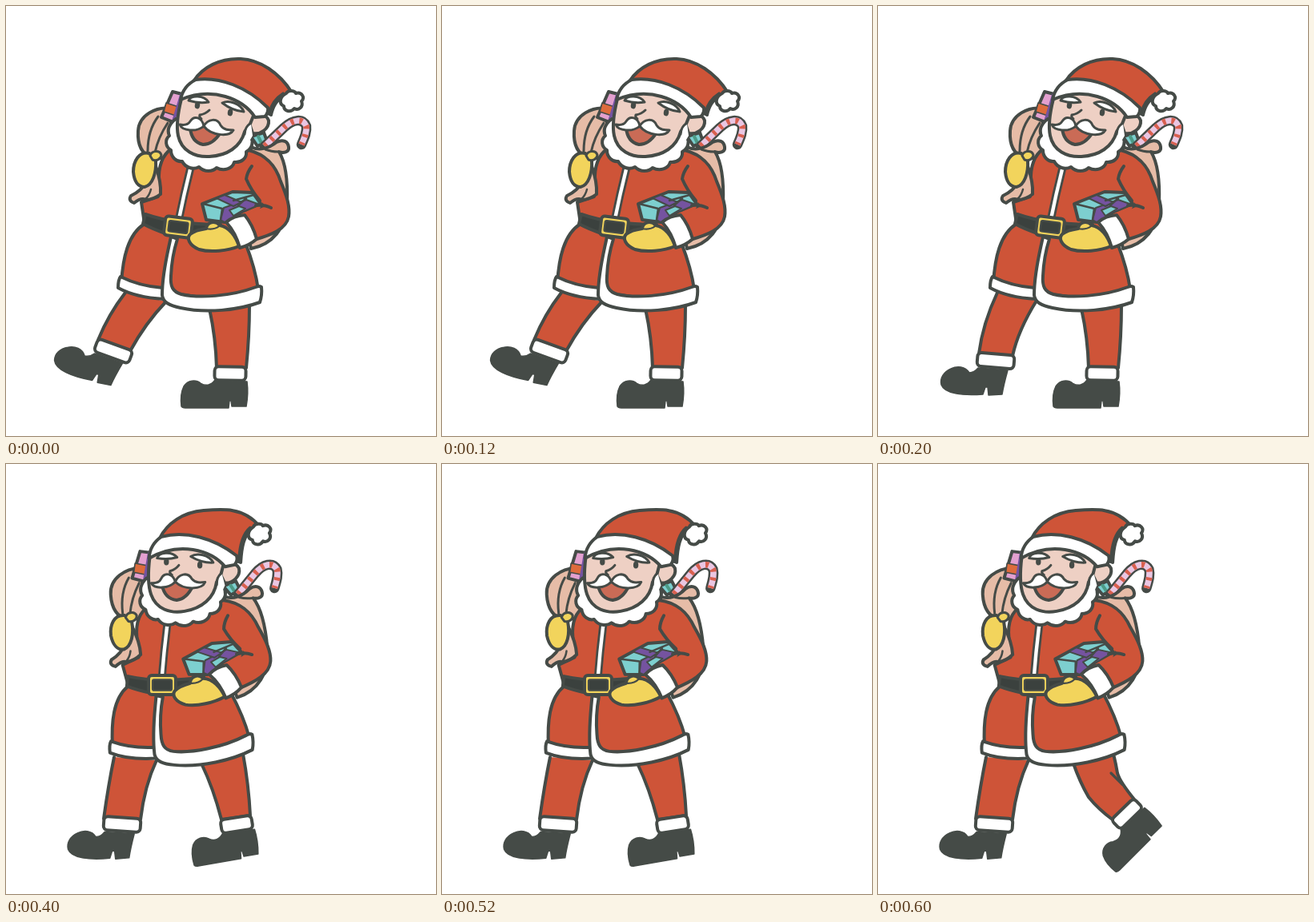
An HTML page with a canvas that plays this animation: 537 px wide and 537 px high, repeating every 800 ms.

```html
<!DOCTYPE html>
<html lang="en">
<head>
<meta charset="utf-8">
<title>Walking Santa</title>
<style>
html, body { margin: 0; width: 100%; height: 100%; overflow: hidden; background: #fff; }
canvas { display: block; width: 100vw; height: 100vh; }
</style>
</head>
<body>
<canvas id="stage" width="537" height="537"></canvas>
<script>
const ctx = document.getElementById('stage').getContext('2d');
const INK = '#454b47', RED = '#ce5438', WHITE = '#fff', SKIN = '#eed0c4', SACK = '#e6bca7',
  GOLD = '#f2d45c', TEAL = '#7dcfcf', PURPLE = '#7553a0', PINK = '#e3a0cf', BELT = '#3b413e';
const STEP = 200;

function shape(d, fill, line = INK, w = 4) {
  const p = new Path2D(d);
  if (fill) { ctx.fillStyle = fill; ctx.fill(p); }
  if (line) { ctx.strokeStyle = line; ctx.lineWidth = w; ctx.stroke(p); }
}
const stroke = (d, w, color) => shape(d, null, color, w);

function place(x, y, deg, draw) {
  ctx.save();
  ctx.translate(x, y);
  ctx.rotate(deg * Math.PI / 180);
  draw();
  ctx.restore();
}

function box(w, h, r, fill, lw = 4) {
  ctx.beginPath();
  ctx.roundRect(-w / 2, -h / 2, w, h, r);
  ctx.fillStyle = fill;
  ctx.fill();
  ctx.strokeStyle = INK;
  ctx.lineWidth = lw;
  ctx.stroke();
}

function dot(x, y, rx, ry, fill) {
  ctx.beginPath();
  ctx.ellipse(x, y, rx, ry, 0.15, 0, 7);
  ctx.fillStyle = fill;
  ctx.fill();
}

// Boots are drawn around the centre of their cuff.
function farFoot() {
  shape('M-22 9Q-27 15-33 15C-38 7-48 6-56 10C-65 14-70 22-68 30C-64 41-42 44-16 42L-13 33L-10 33L-9 43L8 42Q10 30 15 12Z', INK, INK, 1.5);
  place(0, 0, 5, () => box(46, 17, 5, WHITE));
}
function nearFoot() {
  shape('M-19 8C-24 15-31 16-37 12C-43 7-53 8-58 16C-62 24-62 33-61 41Q-60 43-56 43L-2 43L-1 34L1 34L2 41L20 41Q23 25 21 10Z', INK, INK, 1.5);
  place(0, 0, 1, () => box(39, 17, 5, WHITE));
}

const farPlanted = { leg: 'M135 366Q128 400 122 443L168 444Q173 402 188 370', foot: [145, 450, -1] };
const nearPlanted = { leg: 'M254 378Q262 414 263 452L300 452Q304 412 304 374', foot: [280, 459, 0] };
const poses = [
  { lean: 0, near: nearPlanted,
    far: { leg: 'M149 358Q128 385 115 417L155 431Q174 396 200 369', foot: [134, 431, 15] } },
  { lean: 0, near: nearPlanted,
    far: { leg: 'M149 358Q131 396 126 434L168 437Q175 405 198 368', foot: [147, 443, 0] } },
  { lean: 1, far: farPlanted,
    near: { leg: 'M244 374Q259 405 269 444L305 439Q303 400 296 362', foot: [288, 450, -10] } },
  { lean: 1, far: farPlanted,
    near: { leg: 'M244 374Q252 397 263 416Q275 431 294 445L321 420Q302 397 299 386Q297 374 294 362',
      knee: 'M291 386L305 400', foot: [311, 437, -45] } }
];

function limb({ leg, knee, foot }, drawFoot) {
  shape(leg, RED);
  if (knee) stroke(knee, 3.2);
  place(...foot, drawFoot);
}

function cane() {
  const d = 'M323 175L347 152C359 141 371 140 375 150C376 157 373 164 369 173';
  stroke(d, 12.5);
  ctx.lineCap = 'butt';
  stroke(d, 7.5, '#eac6e2');
  ctx.setLineDash([4, 7]);
  stroke(d, 7.5, '#d9604f');
  ctx.setLineDash([]);
  ctx.lineCap = 'round';
}

function back() {
  // sack
  shape('M206 128C188 125 166 136 165 156C164 172 168 184 182 190L206 190Z', SACK);
  stroke('M190 138Q177 155 177 181M202 146Q190 164 186 183', 3);
  // striped present
  shape('M208 107L224 111L214 147L194 139Z', PINK);
  shape('M200 121L219 127L215 138L197 132Z', '#dd6b3c', INK, 1.6);
  stroke('M219 111L209 144', 4, PURPLE);
  // teal present and cane
  shape('M306 163L322 158L326 169L314 175Z', TEAL);
  stroke('M315 163L319 171', 4, '#4c9a86');
  cane();
  // right side of the sack
  shape('M306 176C316 181 328 178 338 170C346 166 352 169 353 176C354 183 346 184 341 182C350 197 352 220 351 246C350 278 332 298 306 303L290 230Z', SACK);
  stroke('M340 182Q331 182 324 179', 3);
}

function coat() {
  shape('M207 178C195 186 190 200 191 220L190 238L169 245L173 272C152 285 146 315 144 346L200 358L260 366L315 354C312 333 306 314 299 296L330 230L305 178Z', RED);
  // hem and placket
  shape('M143 338Q140 342 140 352Q162 364 197 366L196 352Q167 350 143 338Z', WHITE);
  shape('M206 288C202 308 195 333 195 361C196 370 204 374 218 377C250 384 290 380 317 370Q320 361 319 351Q316 349 312 351C280 363 240 365 219 360C208 357 205 350 206 337Q207 313 214 291Z', WHITE);
  stroke('M230 204Q222 236 216 266', 10);
  stroke('M230 204Q222 236 216 266', 4.4, WHITE);
  // belt
  shape('M174 260Q211 273 268 273L266 284Q228 290 199 284Q182 278 171 272Z', BELT);
  place(215, 276, 7, () => {
    box(34, 24, 4, GOLD);
    box(24, 13.5, 2, BELT, 2.2);
  });
}

function present() {
  shape('M245 247L283 232L308 233L318 247L294 257L273 270L250 267Z', TEAL);
  shape('M272 252L300 242L317 248L294 258L273 270L268 267Z', PURPLE, INK, 2);
  shape('M263 240L273 236L294 245L284 250Z', PURPLE, INK, 2);
  shape('M279 255L291 250L299 253L284 262Z', TEAL, INK, 2);
  stroke('M246 247L270 253L268 267M284 243L309 236M290 249L300 240', 2.5);
}

function arm() {
  shape('M303 180C326 186 337 200 343 219C351 238 355 251 353 263C350 279 331 286 310 292L291 265L324 250Q306 229 302 210Z', RED, null);
  stroke('M303 180C326 186 337 200 343 219C351 238 355 251 353 263C350 279 331 286 310 292M307 200Q301 208 300 216Q306 230 317 243M312 249Q323 248 331 252');
  shape('M275 270Q284 262 298 261Q308 273 313 291Q304 299 292 302Q287 283 275 270Z', WHITE);
  shape('M230 285C236 280 243 279 250 278C251 270 261 267 267 274C279 276 287 288 291 300C277 306 255 308 241 304C229 299 225 290 230 285Z', GOLD);
  stroke('M250 278Q260 280 266 275', 2.2);
}

function grip() {
  shape('M176 219Q169 231 156 237Q152 243 160 246Q169 239 174 242Q184 242 193 235Q194 220 187 200Z', SACK);
  stroke('M174 241Q179 237 181 229', 2.5);
  shape('M179 184C166 181 159 194 159 207C160 219 165 226 173 226C183 224 188 208 187 193Z', GOLD);
  shape('M180 187C182 180 192 180 194 186C194 191 188 194 183 192Z', GOLD, INK, 3);
}

function head() {
  // beard
  shape('M212 141C203 148 201 155 204 162C198 167 199 176 206 180C206 189 213 195 220 194C224 202 234 205 241 201C248 208 258 207 263 202C272 207 283 203 285 195C294 196 301 190 300 182C308 178 309 169 306 164C310 158 309 151 304 146L290 130Z', WHITE);
  // ear
  shape('M301 138C311 132 325 134 328 143C329 153 318 161 308 159Z', SKIN);
  // face
  shape('M219 116C215 132 212 148 215 162C219 181 236 189 254 188C276 187 293 176 298 157L305 147L311 132L294 109L255 100Z', SKIN);
  shape('M299 160Q300 150 306 147L308 162L302 172Z', WHITE, null);
  stroke('M298 160Q299 150 305 147', 3);
  // mouth
  shape('M230 152C231 164 237 171 246 173C256 173 263 166 268 158L247 150Z', '#ca6b56');
  // moustache
  shape('M247 150C245 139 235 136 230 144C227 149 222 149 217 148C220 156 238 158 247 150Z', WHITE, INK, 3);
  shape('M247 150C252 141 264 139 268 149C272 155 278 155 284 155C279 164 256 162 247 150Z', WHITE, INK, 3);
  stroke('M254 130Q249 135 242 136Q241 139 244 141', 3);
  // eyes and brows
  dot(239, 124, 3.2, 4.4, INK);
  dot(280, 133, 3.2, 4.4, INK);
  shape('M228 118C231 111 247 111 253 120Q241 122 228 118Z', WHITE, INK, 3);
  shape('M270 121C279 117 293 122 297 132Q283 131 270 121Z', WHITE, INK, 3);
}

function hat(lean) {
  const at = (x, y) => `${x + 2 * lean} ${y - 15 * lean}`;
  shape(`M234 94C246 76 267 65 293 66C317 67 ${at(341, 83)} ${at(357, 108)}L${at(346, 114)}Q${at(335, 118)} 331 136L300 120Z`, RED);
  stroke(`M${at(346, 109)}Q${at(332, 118)} 329 133`, 3.2);
  shape('M218 117C220 106 227 97 237 92C267 88 301 101 327 127Q328 134 323 138L311 139C296 116 258 100 218 117Z', WHITE);
  shape(`M${at(350, 109)}C${at(353, 104)} ${at(361, 106)} ${at(362, 109)}C${at(369, 107)} ${at(374, 114)} ${at(369, 119)}C${at(372, 126)} ${at(365, 131)} ${at(360, 128)}C${at(355, 134)} ${at(347, 131)} ${at(347, 125)}C${at(340, 122)} ${at(342, 113)} ${at(350, 109)}Z`, WHITE);
}

function draw(ms) {
  const pose = poses[Math.floor(ms / STEP) % poses.length];
  const body = fn => place(215 - 20 * pose.lean, 276, -7 * pose.lean, () => {
    ctx.translate(-215, -276);
    fn();
  });
  ctx.fillStyle = WHITE;
  ctx.fillRect(0, 0, 537, 537);
  ctx.lineJoin = ctx.lineCap = 'round';
  body(back);
  limb(pose.far, farFoot);
  limb(pose.near, nearFoot);
  body(() => {
    coat();
    present();
    arm();
    grip();
    head();
    hat(pose.lean);
  });
}

const start = performance.now();
function tick() {
  draw(performance.now() - start);
  requestAnimationFrame(tick);
}
tick();
</script>
</body>
</html>
```
